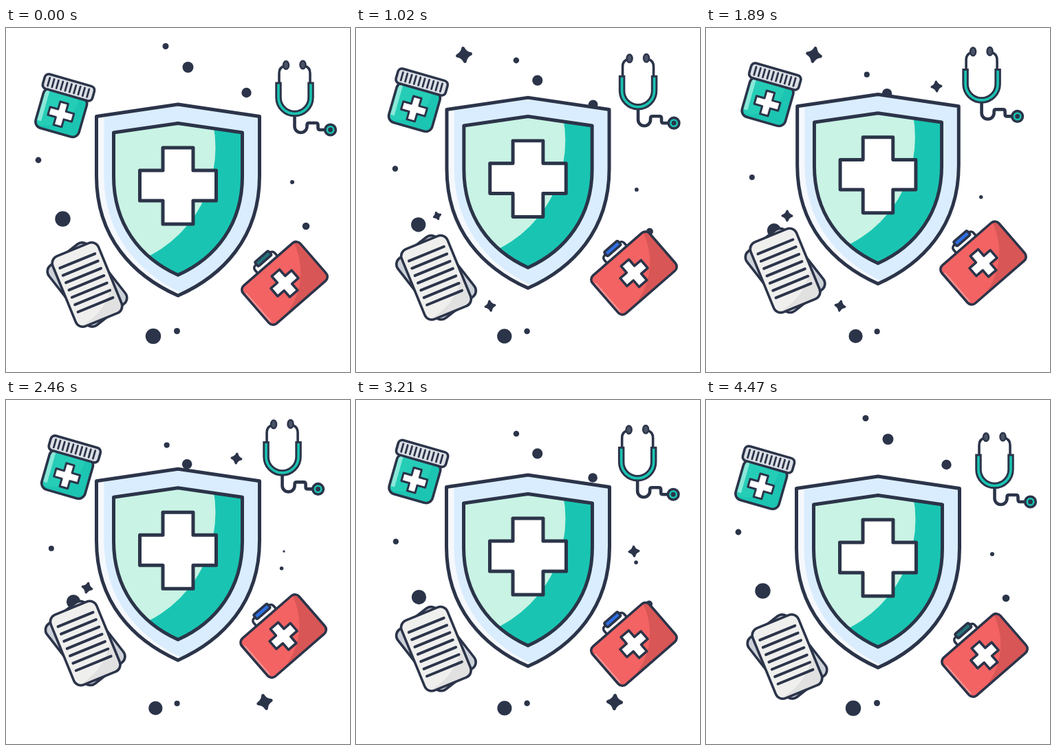
Animation of 500 by 500 pixels, one loop 4.53 s. Source, as an HTML page:

```html
<!DOCTYPE html>
<html lang="en">
<head>
<meta charset="utf-8">
<title>Health shield</title>
<style>
html, body { margin: 0; height: 100%; overflow: hidden; background: #fff; }
svg { display: block; width: 100vw; height: 100vh; }
.ink { fill: #2b3449; }
.line { fill: none; }
.line, .edge { stroke: #2b3449; stroke-width: 3.6; stroke-linejoin: round; stroke-linecap: round; }
</style>
</head>
<body>
<svg viewBox="0 0 500 500">
  <defs>
    <path id="outer" d="M250 111L368.5 128.5V215C368.5 305 315 360 250 389C185 360 131.5 305 131.5 215V128.5Z"/>
    <path id="inner" d="M250 138.5L343.5 152V216C343.5 284 306 334 250 359C194 334 156.5 284 156.5 216V152Z"/>
    <rect id="sheet" x="-36" y="-55" width="72" height="110" rx="11"/>
    <rect id="case" x="-55" y="-36.5" width="110" height="73" rx="8"/>
    <rect id="jar" x="-33" y="8" width="65.5" height="60" rx="10"/>
    <clipPath id="inOuter"><use href="#outer"/></clipPath>
    <clipPath id="inInner"><use href="#inner"/></clipPath>
    <clipPath id="inSheet"><use href="#sheet"/></clipPath>
    <clipPath id="inCase"><use href="#case"/></clipPath>
    <clipPath id="inJar"><use href="#jar"/></clipPath>
  </defs>

  <g id="dots" class="ink"></g>
  <g id="stars" class="ink"></g>

  <g id="shield">
    <use href="#outer" fill="#f5f8fc"/>
    <g clip-path="url(#inOuter)"><use href="#outer" x="11" y="-1" fill="#daedfe"/></g>
    <use href="#outer" class="line" style="stroke-width:5"/>
    <use href="#inner" fill="#19c5b2"/>
    <circle cx="128" cy="174" r="176.5" fill="#c9f3e4" clip-path="url(#inInner)"/>
    <use href="#inner" class="line" style="stroke-width:5"/>
    <path d="M228 174h44v33h33.5v44H272v34h-44v-34h-33.5v-44H228Z" fill="#fff" class="edge" style="stroke-width:5"/>
  </g>

  <g id="bottle"><g transform="translate(91 86.5) rotate(16)">
    <use href="#jar" fill="#1cc5b2"/>
    <g clip-path="url(#inJar)">
      <circle cx="-30" cy="15" r="49" fill="#25cdb7"/>
      <path d="M-28 8V58" stroke="#8ae8d8" stroke-width="6"/>
    </g>
    <use href="#jar" class="line"/>
    <rect x="-37.5" y="-11" width="75" height="22" rx="6" fill="#dcdfe5" class="edge"/>
    <path id="ridges" class="line" style="stroke-width:2.8"/>
    <path d="M-6 23H6V34.5H18V46.5H6V58H-6V46.5H-18V34.5H-6Z" fill="#fff" class="edge" style="stroke-width:3"/>
  </g></g>

  <g id="papers"><g transform="translate(118 373)">
    <use href="#sheet" transform="rotate(-38)" fill="#ccd1d9" class="edge"/>
    <g transform="rotate(-22.3)">
      <use href="#sheet" fill="#e1e1e1"/>
      <circle cx="-40" cy="-35" r="88" fill="#efefee" clip-path="url(#inSheet)"/>
      <use href="#sheet" class="line"/>
      <path id="text" class="line" style="stroke-width:4"/>
    </g>
  </g></g>

  <g id="kit"><g transform="translate(405 371) rotate(-41)">
    <rect x="-20" y="-47.5" width="38" height="16" rx="5" fill="#fff" class="edge"/>
    <rect id="grip" x="-13" y="-51.5" width="26" height="8" rx="2" class="edge"/>
    <use href="#case" fill="#d85656"/>
    <g clip-path="url(#inCase)">
      <circle cx="-46" cy="-61" r="98" fill="#f36363"/>
      <path d="M-52 -26V29" stroke="#f49292" stroke-width="2.5"/>
    </g>
    <use href="#case" class="line"/>
    <path d="M-7.5 -20H7.5V-7.5H20V7.5H7.5V20H-7.5V7.5H-20V-7.5H-7.5Z" fill="#fff" class="edge"/>
  </g></g>

  <g id="stethoscope">
    <path d="M405 55Q397 57 397 66V80M434 55Q442 57 442 66V80" class="line"/>
    <ellipse cx="407" cy="54" rx="4" ry="5.8" fill="#4b5366" class="edge" style="stroke-width:2.5"/>
    <ellipse cx="431.5" cy="53.5" rx="4" ry="5.8" fill="#4b5366" class="edge" style="stroke-width:2.5"/>
    <path d="M419.5 127V143a9 9 0 0 0 18 0v-2q0-3 3-3h10q3 0 3 3v4q0 3 3 3h7" class="line" style="stroke-width:4.6"/>
    <path d="M396 78.5V101a23.5 23.5 0 0 0 47 0V78.5" class="line" style="stroke-width:9.5;stroke-linecap:butt"/>
    <path d="M396 81.5V101a23.5 23.5 0 0 0 47 0V81.5" fill="none" stroke="#19c5b2" stroke-width="3.6"/>
    <circle cx="471.5" cy="148" r="7.8" fill="#19c5b2" class="edge"/>
    <circle cx="471.5" cy="148" r="3.4" class="ink"/>
  </g>
</svg>
<script>
const LOOP = 4530;
const el = id => document.getElementById(id);
const clamp = x => Math.min(1, Math.max(0, x));
const ease = x => (x = clamp(x), x * x * (3 - 2 * x));
// Rises from start to peak, falls back from peak to end.
const swell = (t, start, peak, end) =>
  t < peak ? ease((t - start) / (peak - start)) : ease((end - t) / (end - peak));
const move = (id, x, y) => el(id).setAttribute("transform", `translate(${x} ${y})`);

// x, y, radius
const dots = [
  [232, 26.5, 4.5], [264.5, 57, 8], [349.5, 94, 7.2], [47, 192, 4.4], [82.5, 277.5, 11.2],
  [416, 224, 3], [436, 288, 5.3], [214, 448, 11.2], [248.5, 440.5, 4.5]
];
// x, y, radius, birth, death
const stars = [
  [157, 39, 12, 300, 2430], [195, 404, 8.5, 380, 2480], [335, 85, 8.5, 1050, 3230],
  [118, 273, 8.5, 850, 2900], [404, 220, 8.5, 2380, 4410], [376, 439, 12, 2050, 4080]
];
// id, rise in x, rise in y
const floats = [["bottle", 9.5, -16.3], ["papers", -3, -21], ["kit", -2, -30], ["stethoscope", -19.3, -20]];

const strokes = (n, draw) => Array.from({ length: n }, (_, i) => draw(i)).join("");
el("dots").innerHTML = dots.map(([x, y, r]) => `<circle cx="${x}" cy="${y}" r="${r}"/>`).join("");
el("stars").innerHTML = stars.map(() => `<path stroke="#2b3449" stroke-linejoin="round"/>`).join("");
el("ridges").setAttribute("d", strokes(10, i => `M${-30 + i * 6.6} -6V6`));
el("text").setAttribute("d", strokes(7, i => `M-27.5 ${-37.3 + i * 11.5}H27.5`));

// Four rounded points, drawn at radius r.
function starPath(r) {
  const tip = 0.8 * r, waist = 0.19 * r;
  return `M0 ${-tip}Q${waist} ${-waist} ${tip} 0Q${waist} ${waist} 0 ${tip}` +
    `Q${-waist} ${waist} ${-tip} 0Q${-waist} ${-waist} 0 ${-tip}Z`;
}

function draw(t) {
  const rise = swell(t, 0, 2070, 4470);
  for (const [id, x, y] of floats) move(id, x * rise, y * rise);

  el("dots").setAttribute("transform",
    `translate(250 447) scale(${1 - 0.1 * rise}) translate(-250 -447)`);

  const lift = -16.3 * swell(t, 0, 1720, 3620);
  const size = 1 - 0.036 * swell(t, 900, 1500, 2100);
  el("shield").setAttribute("transform",
    `translate(250 ${250 + lift}) scale(${size}) translate(-250 -250)`);

  [...el("stars").children].forEach((star, i) => {
    const [x, y, r, birth, death] = stars[i];
    const radius = r * Math.min(ease((t - birth) / 250), ease((death - t) / 300));
    const turn = 50 * (t - birth) / (death - birth) - 25;
    star.setAttribute("d", radius ? starPath(radius) : "");
    star.setAttribute("stroke-width", 0.4 * radius);
    star.setAttribute("transform", `translate(${x} ${y}) rotate(${turn})`);
  });

  el("grip").setAttribute("fill", t > 900 && t < 4350 ? "#2f6fe4" : "#25727a");
}

function tick() {
  draw(performance.now() % LOOP);
  requestAnimationFrame(tick);
}
tick();
</script>
</body>
</html>
```
